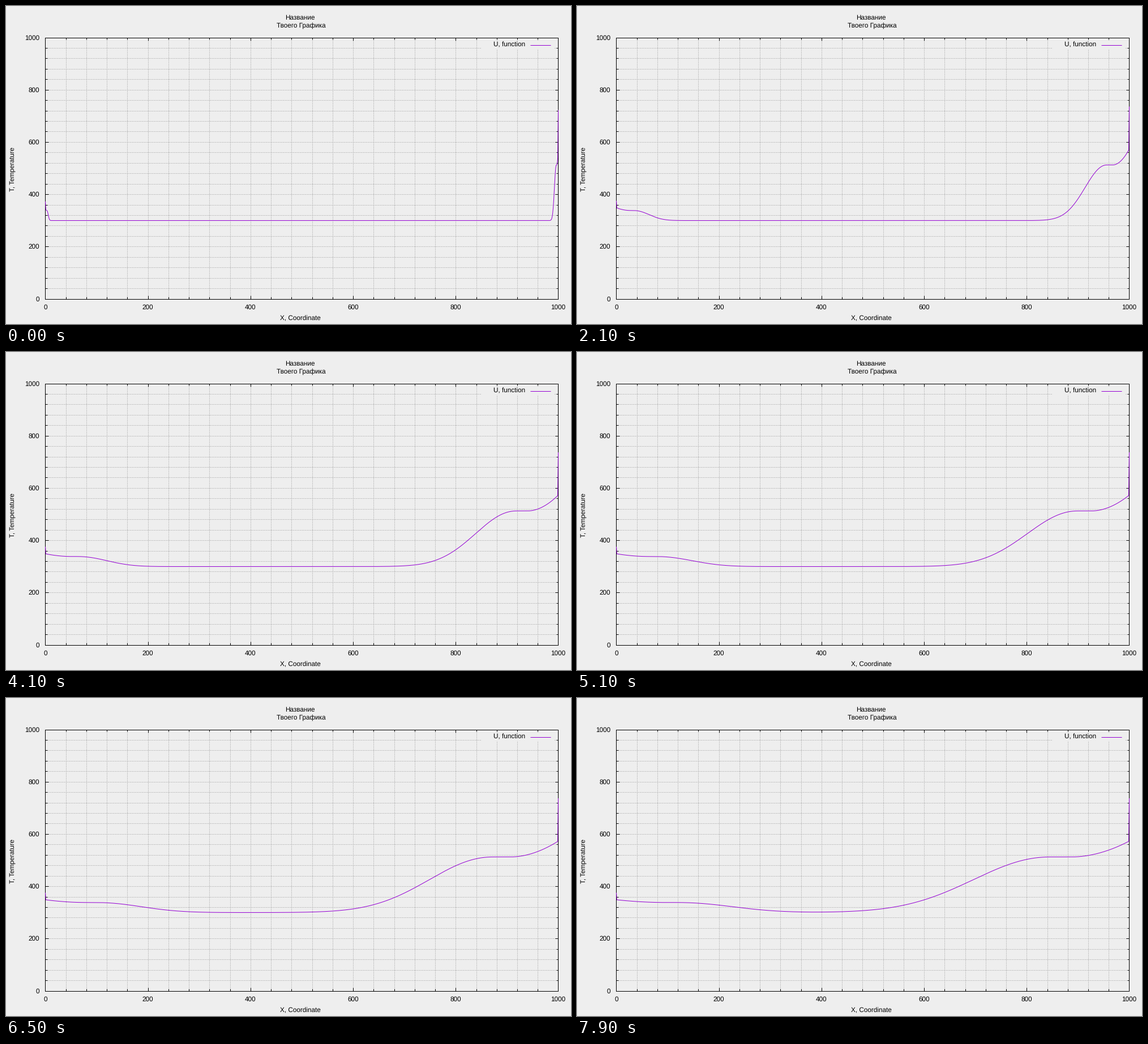
A matplotlib script that plays this animation: 998 by 561 pixels, repeating every 8 s.

```python
import numpy as np
import matplotlib.pyplot as plt
from matplotlib.animation import FuncAnimation
from matplotlib.patches import Rectangle

W, H, DPI = 998, 561, 64
PX = 72 / DPI                       # points per pixel
LEFT, RIGHT, TOP, BOTTOM = 69.5, 975.5, 55.5, 516.5
FRAMES, STEP = 80, 100
BG, INK, GRID, CURVE = "#eeeeee", "#000000", "#a0a0a0", "#9400d3"

plt.rcParams["font.family"] = "Liberation Sans"
plt.rcParams["text.hinting"] = "none"

fig = plt.figure(figsize=(W / DPI, H / DPI), dpi=DPI, facecolor=BG)
ax = fig.add_axes([0, 0, 1, 1])
ax.set(xlim=(0, W), ylim=(H, 0))
ax.axis("off")


def px(x):
    return LEFT + x * (RIGHT - LEFT) / 1000


def py(t):
    return BOTTOM - t * (BOTTOM - TOP) / 1000


def line(x, y, color=INK, z=3, **kw):
    return ax.plot(x, y, color=color, lw=PX, zorder=z,
                   solid_capstyle="butt", **kw)[0]


def label(x, y, s, ha="center", va="baseline", **kw):
    ax.text(x, y, s, ha=ha, va=va, color=INK, fontsize=11.7 * PX,
            zorder=6, **kw)


# Grid, ticks and frame
for v in range(0, 1001, 40):
    gx, gy = px(v), py(v)
    size = 5.5 if v % 200 == 0 else 3.5
    if 0 < v < 1000:
        dots = dict(color=GRID, z=1, dashes=(1.2, 1.8), dash_capstyle="butt")
        line([gx, gx], [BOTTOM, TOP], **dots)
        line([LEFT, RIGHT], [gy, gy], **dots)
    for edge, d in ((BOTTOM, -size), (TOP, size)):
        line([gx, gx], [edge, edge + d])
    for edge, d in ((LEFT, size), (RIGHT, -size)):
        line([edge, edge + d], [gy, gy])
    if v % 200 == 0:
        label(gx, 534.5, str(v))
        label(59.5, gy + 4, str(v), "right")

ax.add_patch(Rectangle((839, 61), 129, 14.5, fc=BG, ec="none", zorder=2))
ax.add_patch(Rectangle((LEFT, TOP), RIGHT - LEFT, BOTTOM - TOP,
                       fill=False, ec=INK, lw=PX, zorder=3))

# Captions and key
label(519, 24.3, "Название")
label(521.7, 38.3, "Твоего Графика")
label(520.3, 554.5, "X, Coordinate")
label(11.5, 287.5, "T, Temperature", va="center", rotation=90)
label(917.5, 71.7, "U, function", "right")
line([926, 962], [68.5, 68.5], CURVE, 5)

BASE, SPREAD = 299.4, FRAMES + 1


def front(d, height, start, width, power, bump, reach):
    """Plateau with a long soft foot, plus a rise next to the wall."""
    foot = np.maximum(d - start, 0) / width
    near = np.maximum(1 - d / reach, 0)
    return height * np.exp(-foot ** power) + bump * near ** 1.9


def temperature(k):
    # Both fronts keep their shape and stretch evenly with time
    scale = SPREAD / (k + 2)
    t = (BASE + front(X * scale, 38.4, 115, 147, 2.2, 10.5, 95)
         + front((1000 - X) * scale, 212.8, 153, 205, 2.1, 60.7, 112))
    # Wall cells jump above their neighbours
    t[0] = 375.5 - 0.42 * (349 - t[1])
    t[-1] = 737.4 - 0.42 * (573.5 - t[-2])
    return t


X = np.arange(1001)
curve = line(px(X), py(temperature(0)), CURVE, 5)


def update(k):
    curve.set_ydata(py(temperature(k)))
    return (curve,)


anim = FuncAnimation(fig, update, frames=FRAMES, interval=STEP,
                     repeat=True, repeat_delay=0, blit=False)
plt.show()
```
